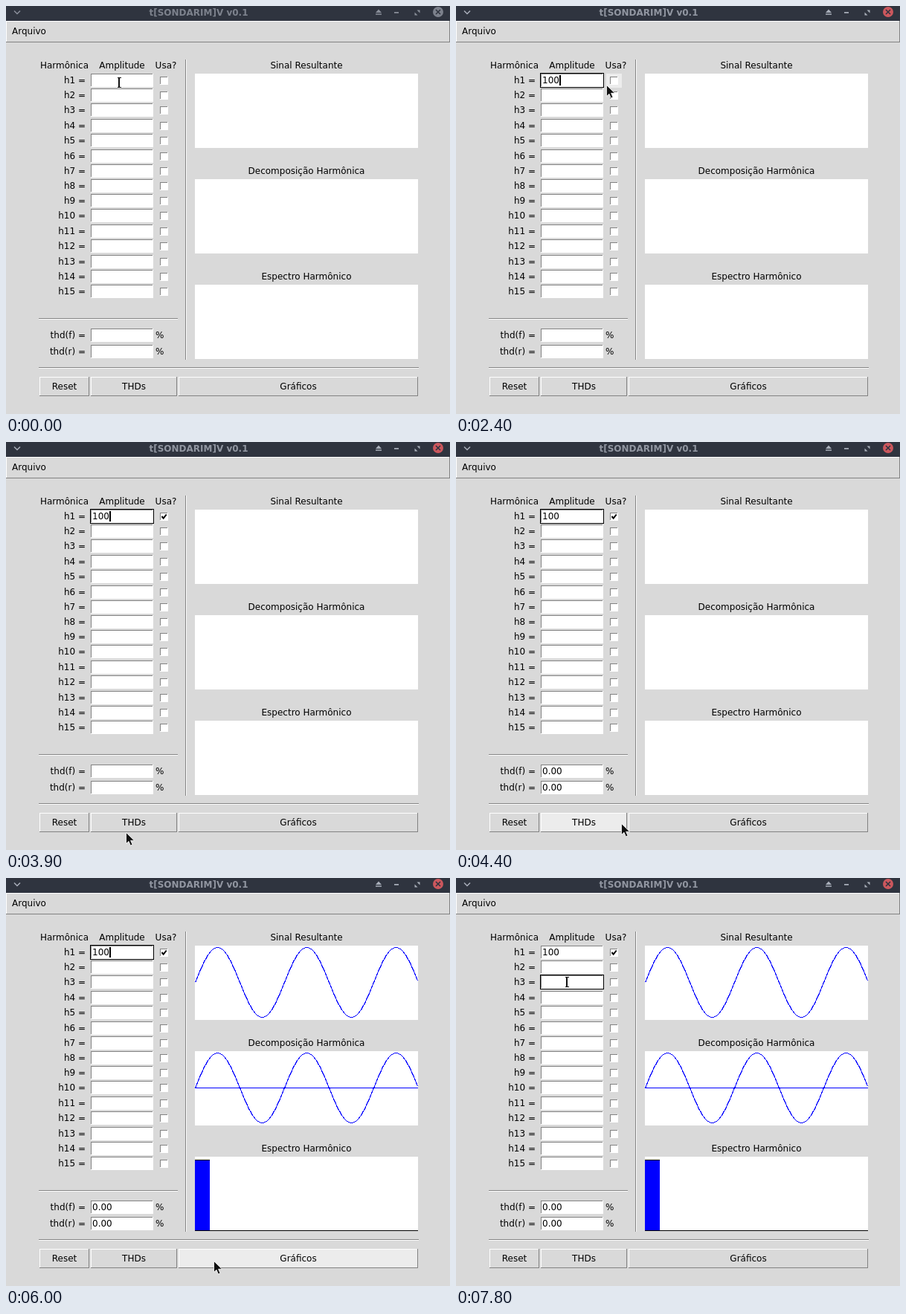
Write an HTML page that moves like this. It is 597 by 549 pixels and loops after 8000 ms.

```html
<!DOCTYPE html>
<html lang="pt">
<head>
<meta charset="utf-8">
<title>t[SONDARIM]V</title>
<style>
html, body { margin: 0; width: 100%; height: 100%; overflow: hidden; background: #d9d9d9; }
svg { display: block; width: 597px; height: 549px; shape-rendering: crispEdges; }
text { font: 12px "DejaVu Sans", sans-serif; white-space: pre; }
.smooth { shape-rendering: auto; }
</style>
</head>
<body>
<svg id="stage" viewBox="0 0 597 549"></svg>
<script>
const LOOP = 8000, GRAY = '#d9d9d9', HOVER = '#ececec', DARK = '#828282';
const stage = document.getElementById('stage');

function add(tag, attrs, parent = stage) {
  const e = document.createElementNS('http://www.w3.org/2000/svg', tag);
  for (const k in attrs) e.setAttribute(k, attrs[k]);
  parent.append(e);
  return e;
}
const rect = (x, y, width, height, fill, parent) => add('rect', { x, y, width, height, fill }, parent);
const path = (d, attrs, parent) => add('path', { d, fill: 'none', ...attrs }, parent);
function label(str, x, y, anchor = 'start') {
  const e = add('text', { x, y, 'text-anchor': anchor });
  e.textContent = str;
  return e;
}
const show = (e, on) => e.setAttribute('visibility', on ? 'visible' : 'hidden');

// One-pixel 3D frame; returns its parts so that it can be repainted.
function bevel(x, y, w, h, fill, sunken) {
  const low = rect(x, y, w, h), top = rect(x, y, w - 1, h - 1), body = rect(x + 1, y + 1, w - 2, h - 2);
  const paint = (color, down) => {
    low.setAttribute('fill', down ? '#fff' : DARK);
    top.setAttribute('fill', down ? DARK : '#fff');
    body.setAttribute('fill', color);
  };
  paint(fill, sunken);
  return paint;
}

// Title bar and menu
rect(0, 0, 597, 20, '#2f343f');
const title = label('t[SONDARIM]V v0.1', 259, 13, 'middle');
title.style.fontWeight = 'bold';
const icons = add('g', { class: 'smooth' });
path('M11 6.5l4 4 4-4', { stroke: 'currentColor', 'stroke-width': 1.5 }, icons);
path('M497 9l4-4.5 4 4.5zM497 10.2h8v1.6h-8zM522 8h6v1.8h-6z', { fill: 'currentColor' }, icons);
path('M552.5 5.5h4v4zM549.5 8.5v4h4z', { fill: 'currentColor' }, icons);
const closeDot = add('circle', { cx: 581, cy: 8, r: 7 }, icons);
path('M578 5l6 6M584 5l-6 6', { stroke: '#2f343f', 'stroke-width': 1.6 }, icons);
bevel(0, 20, 597, 29, GRAY, false);
label('Arquivo', 8, 38);

// Harmonics table
label('Harmônica', 78.5, 84, 'middle');
label('Amplitude', 156, 84, 'middle');
label('Usa?', 215, 84, 'middle');
const checkHover = rect(202, 91, 21, 19, HOVER);
const focus = {};
function field(y) {
  const ring = rect(113, y - 10, 86, 20, '#000');
  bevel(114, y - 9, 84, 18, '#fff', true);
  return { ring, text: label('', 116, y + 4) };
}
const rows = [100, 120, 140, 161, 181, 202, 222, 242, 262, 282, 303, 323, 344, 364, 384];
const fields = rows.map((y, i) => {
  label(`h${i + 1} =`, 107, y + 4, 'end');
  bevel(207, y - 5, 11, 11, '#fff', true);
  return field(y);
});
const check = path('M209.5 100l2.2 2.7 4-5.2', { stroke: '#000', 'stroke-width': 2, class: 'smooth' });

const thds = [['thd(f) =', 443], ['thd(r) =', 465]].map(([name, y]) => {
  label(name, 107, y + 4, 'end');
  label('%', 201, y + 4);
  return field(y);
});
thds.concat(fields).forEach(f => show(f.ring, false));

// Grooves
for (const [x, y, w, h] of [[44, 420, 187, 1], [44, 486, 511, 1], [241, 72, 1, 404]]) {
  rect(x + (w === 1), y + (h === 1), w, h, '#fff');
  rect(x, y, w, h, DARK);
}

// Plots
for (const [name, y] of [['Sinal Resultante', 91], ['Decomposição Harmônica', 233], ['Espectro Harmônico', 375]]) {
  label(name, 404, y - 7, 'middle');
  rect(254, y, 300, 100, '#fff');
}
const plots = add('g', {});
function sine(mid) {
  let d = '';
  for (let x = 0; x < 300; x++)
    d += `${x ? 'L' : 'M'}${254.5 + x} ${mid + .5 - Math.round(47 * Math.sin(x * Math.PI / 60))}`;
  path(d, { stroke: '#00f' }, plots);
}
sine(140);
sine(282);
rect(254, 282, 300, 1, '#00f', plots);
rect(254, 379, 20, 96, '#000', plots);
rect(254, 380, 19.5, 94, '#00f', plots);
rect(254, 474, 300, 1, '#000', plots);

// Buttons
function button(name, x, w) {
  const paint = bevel(x, 499, w, 26, GRAY, false);
  const text = label(name, x + w / 2, 516, 'middle');
  return (hover, down) => {
    paint(hover ? HOVER : GRAY, down);
    text.setAttribute('transform', down ? 'translate(2 2)' : '');
  };
}
button('Reset', 45, 67);
const thdButton = button('THDs', 114, 116);
const plotButton = button('Gráficos', 232, 322);

// Text caret and mouse pointers
const caret = rect(0, 0, 2, 14, '#000');
const arrow = path('M.5 .5V15.5L4 12.3 6.4 18 9 16.8 6.6 11.3H11.5z',
  { fill: '#111', stroke: '#fff', 'stroke-width': .8, class: 'smooth' });
const beam = add('g', {});
const beamShape = 'M-2.5 -6.5h2l.5 .5 .5 -.5h2M0 -6.5V6.5M-2.5 6.5h5';
path(beamShape, { stroke: '#fff', 'stroke-width': 3 }, beam);
path(beamShape, { stroke: '#111', 'stroke-width': 1.2 }, beam);

// time, kind (I = beam, A = arrow), x, y
const moves = [
  [0, 'I', 152, 103], [1800, 'I', 165, 101], [1900, 'I', 185, 99], [2000, 'A', 203, 96],
  [2100, 'A', 212, 95], [2200, 'A', 217, 95], [2400, 'A', 202, 106], [3500, 'A', 186, 430],
  [3700, 'A', 163, 522], [3900, 'A', 161, 525], [4100, 'A', 222, 513], [4800, 'A', 255, 516],
  [5000, 'A', 262, 512], [5100, 'A', 269, 508], [5300, 'A', 271, 508], [5700, 'A', 277, 513],
  [6000, 'A', 279, 515], [6200, 'I', 184, 289], [6400, 'I', 172, 220], [6500, 'I', 161, 153],
  [6700, 'I', 153, 131], [6900, 'I', 151, 140], [7600, 'I', 149, 140]
];
const caretOn = [[100, 700], [800, 1600], [1900, 3500], [3700, 4300], [4800, 5300], [5500, 6200], [6400, 7800]];

function draw(t) {
  const within = (a, b) => t >= a && t < b;
  const active = t >= 100;
  title.setAttribute('fill', active ? '#9196a1' : '#7d828d');
  icons.style.color = active ? '#a9afba' : '#8a8f9a';
  closeDot.setAttribute('fill', active ? '#cc575d' : '#7c818c');

  const typed = Math.max(0, Math.min(3, Math.floor(t / 100) - 7));
  fields[0].text.textContent = '100'.slice(0, typed);
  show(fields[0].ring, within(100, 7200));
  show(fields[2].ring, t >= 7200);
  thds.forEach(f => f.text.textContent = t >= 4400 ? '0.00' : '');

  show(check, t >= 3500);
  show(checkHover, within(2000, 3500));
  show(plots, t >= 5500);
  thdButton(within(3700, 3900) || within(4100, 4800), within(4300, 4400));
  plotButton(within(4800, 6200), within(5100, 5500));

  const third = t >= 7200;
  show(caret, caretOn.some(([a, b]) => within(a, b)));
  caret.setAttribute('x', third ? 115 : 115 + 8 * typed);
  caret.setAttribute('y', third ? 133 : 93);

  const [, kind, x, y] = moves.findLast(m => m[0] <= t);
  show(arrow, kind === 'A');
  show(beam, kind === 'I');
  (kind === 'A' ? arrow : beam).setAttribute('transform', `translate(${x} ${y})`);
}

const start = performance.now();
function tick() {
  draw((performance.now() - start) % LOOP);
  requestAnimationFrame(tick);
}
tick();
</script>
</body>
</html>
```
